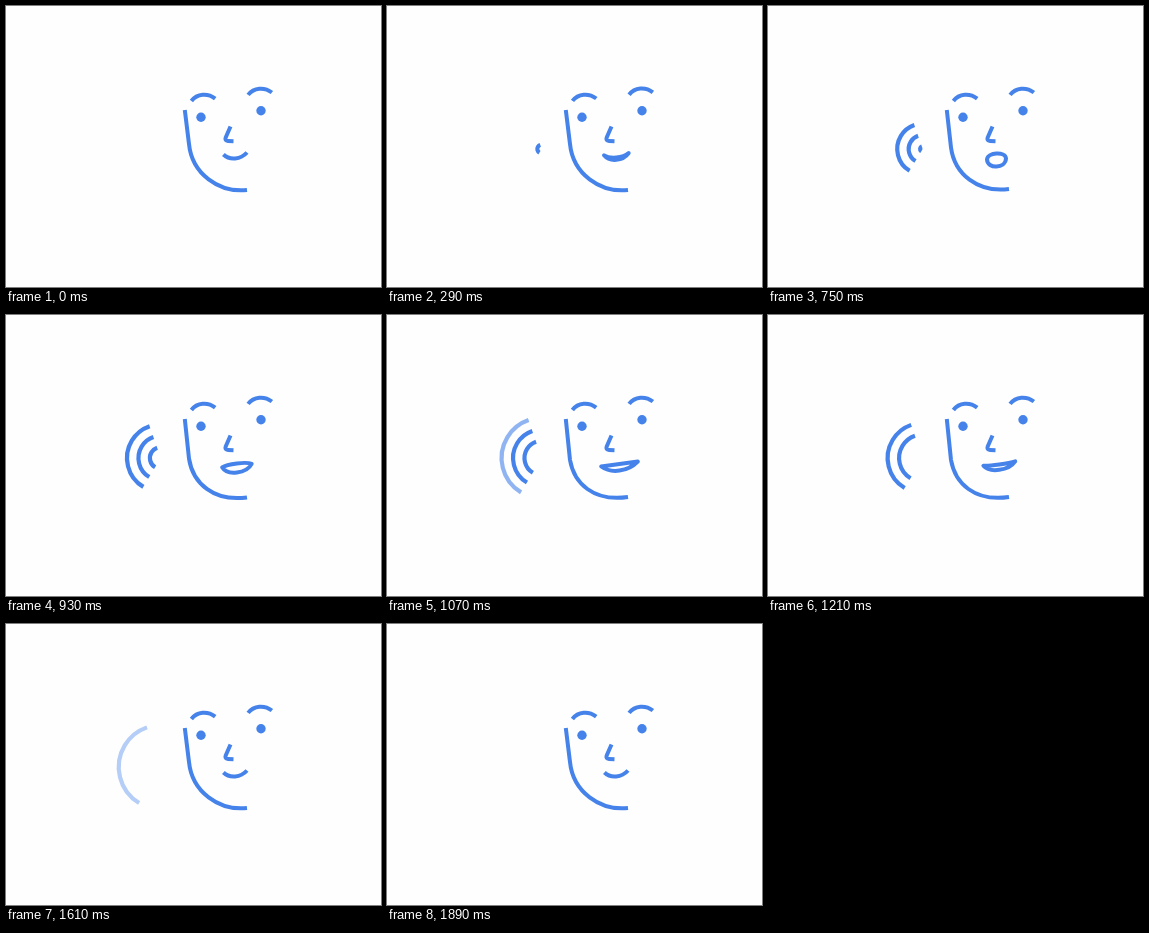
An HTML page with a canvas for the animation above (2000 ms loop, 375x281 px).

```html
<!DOCTYPE html>
<html lang="en">
<head>
<meta charset="utf-8">
<title>Talking face</title>
<style>
  html, body { margin: 0; width: 100%; height: 100%; overflow: hidden; background: #fefefe; }
  canvas { display: block; width: 375px; height: 281px; }
</style>
</head>
<body>
<canvas id="stage"></canvas>
<script>
const W = 375, H = 281, LOOP = 2000;
const BLUE = '#4583ea', PAPER = '#fefefe';
const canvas = document.getElementById('stage');
const ctx = canvas.getContext('2d');
const dpr = window.devicePixelRatio || 1;
canvas.width = W * dpr;
canvas.height = H * dpr;

// x, y: centre; w: half width; tilt: rise to the right corner;
// top, low: sag of each lip; full: lip roundness; tuck: chin pulled in
const smile = { x: 229.2, y: 147.5, w: 11.8, tilt: 1, top: 4.9, low: 4.9, full: 0.47, tuck: 0 };
const wide  = { x: 230, y: 151.2, w: 14.6, tilt: 1.5, top: -3, low: 8.7, full: 0.8, tuck: 0 };
const round = { x: 228.5, y: 153, w: 9.5, tilt: 0.5, top: -5.5, low: 7.5, full: 0.95, tuck: 0.5 };
const grin  = { x: 232.5, y: 149, w: 18.3, tilt: 2.5, top: 0, low: 6.6, full: 0.45, tuck: 1 };
const press = { x: 230, y: 148, w: 13.3, tilt: 1.8, top: 2, low: 6, full: 0.75, tuck: 1 };
const poses = [[210, smile], [500, wide], [750, round], [1070, grin], [1360, press], [1570, smile]];

const clamp = v => Math.max(0, Math.min(1, v));
const smooth = v => { v = clamp(v); return v * v * (3 - 2 * v); };
const mix = (a, b, k) => a + (b - a) * k;
const bump = (t, mid, half) => smooth(1 - Math.abs(t - mid) / half);

function poseAt(t) {
  const i = poses.findIndex(([time]) => t < time);
  if (i < 1) return smile;
  const [t0, a] = poses[i - 1], [t1, b] = poses[i];
  const k = smooth((t - t0) / (t1 - t0));
  const pose = {};
  for (const key in a) pose[key] = mix(a[key], b[key], k);
  return pose;
}

function stroke(path) {
  ctx.beginPath();
  path();
  ctx.stroke();
}

// side is 1 for a lip drawn left to right, -1 for right to left
function lip(m, sag, side) {
  const reach = m.w * m.full * side, rise = m.tilt * m.full * side;
  const y = m.y + sag * 4 / 3;
  ctx.bezierCurveTo(m.x - reach, y + rise, m.x + reach, y - rise,
    m.x + m.w * side, m.y - m.tilt * side);
}

function drawMouth(m) {
  stroke(() => {
    ctx.moveTo(m.x - m.w, m.y + m.tilt);
    lip(m, m.top, 1);
    if (m.low - m.top > 0.05) {
      lip(m, m.low, -1);
      ctx.closePath();
    }
  });
}

function drawJaw(tuck) {
  stroke(() => {
    ctx.moveTo(178.8, 104);
    ctx.lineTo(183, 138 + 7 * tuck);
    ctx.bezierCurveTo(186 + tuck, 168, 213 - 7 * tuck, 187, 241, 184 - 2 * tuck);
  });
}

function drawBrow(x, y) {
  stroke(() => {
    ctx.moveTo(x - 11.9, y + 1.2);
    ctx.bezierCurveTo(x - 6.2, y - 6.3, x + 4.4, y - 7, x + 11.9, y - 1.2);
  });
}

function drawEye(x, y, open) {
  ctx.beginPath();
  ctx.ellipse(x, y, 4.7, 4.7 * open, 0, 0, Math.PI * 2);
  ctx.fill();
}

function drawNose() {
  stroke(() => {
    ctx.moveTo(224.5, 120.5);
    ctx.lineTo(219.7, 131.5);
    ctx.quadraticCurveTo(218.5, 134.8, 222, 135);
    ctx.lineTo(227.5, 135.2);
  });
}

// A sound ripple that widens from a fixed centre and fades out.
function drawRipple(age) {
  const r = 2.5 + age * 0.0458;
  const alpha = clamp(1 - (age - 740) / 200);
  if (r <= 0 || alpha === 0) return;
  ctx.globalAlpha = alpha;
  ctx.lineWidth = Math.min(4.2, 2 * r);
  stroke(() => ctx.arc(154.7, 143, r, Math.PI * 0.672, Math.PI * 1.394));
  ctx.globalAlpha = 1;
}

function draw(t) {
  ctx.setTransform(dpr, 0, 0, dpr, 0, 0);
  ctx.fillStyle = PAPER;
  ctx.fillRect(0, 0, W, H);
  ctx.fillStyle = ctx.strokeStyle = BLUE;
  ctx.lineJoin = 'round';

  for (let start = 250; start <= 750; start += 250) drawRipple(t - start);

  ctx.lineWidth = 4;
  const pose = poseAt(t);
  const lift = bump(t, 500, 260);
  const open = 1 - 0.7 * Math.max(bump(t, 580, 110), bump(t, 1425, 110));
  drawJaw(pose.tuck);
  drawBrow(197.3 + 0.7 * lift, 93.8 - lift);
  drawBrow(254 - 0.3 * lift, 87.7 - 1.3 * lift);
  drawEye(195, 111.2, open);
  drawEye(255, 104.8, open);
  drawNose();
  drawMouth(pose);
}

const begin = performance.now();
function tick(now) {
  draw(Math.max(0, now - begin) % LOOP);
  requestAnimationFrame(tick);
}
draw(0);
requestAnimationFrame(tick);
</script>
</body>
</html>
```
